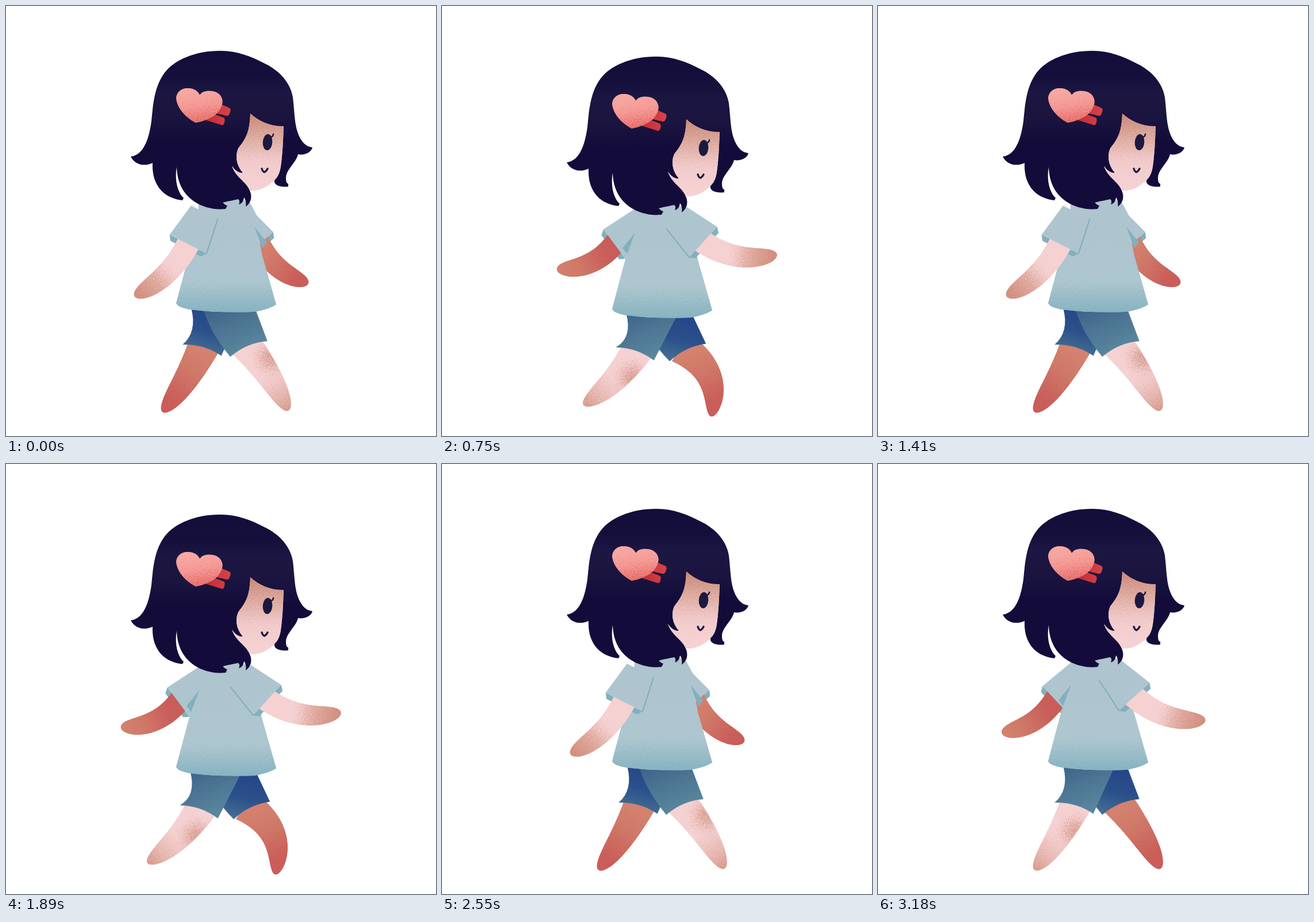
Animation, 748 px wide and 748 px high, one loop 3270 ms. Source, as an HTML page:

```html
<!DOCTYPE html>
<html lang="en">
<head>
<meta charset="utf-8">
<title>Walk cycle</title>
<style>
  html, body { margin: 0; width: 100%; height: 100%; overflow: hidden; background: #fff; }
  svg { display: block; width: 100vw; height: 100vh; }
</style>
</head>
<body>
<svg viewBox="0 0 748 748">
  <defs>
    <filter id="grain" color-interpolation-filters="sRGB">
      <feTurbulence type="fractalNoise" baseFrequency=".55" numOctaves="2" seed="4"/>
      <feColorMatrix values="1 0 0 0 0  0 1 0 0 0  0 0 1 0 0  0 0 0 0 1" result="noise"/>
      <feDisplacementMap in="SourceGraphic" in2="noise" scale="60" xChannelSelector="R" yChannelSelector="G"/>
    </filter>
    <linearGradient id="hairFill" x2="0" y2="1">
      <stop offset="0" stop-color="#130d3a"/><stop offset=".16" stop-color="#150f3c"/>
      <stop offset=".27" stop-color="#1c1642"/><stop offset=".42" stop-color="#1a143f"/>
      <stop offset=".58" stop-color="#130c3b"/><stop offset="1" stop-color="#130c3b"/>
    </linearGradient>
    <linearGradient id="faceFill" gradientUnits="userSpaceOnUse" x1="0" y1="185" x2="0" y2="322">
      <stop offset="0" stop-color="#c98876"/><stop offset=".3" stop-color="#dba99d"/>
      <stop offset=".62" stop-color="#f2cbcb"/><stop offset="1" stop-color="#f6d3d5"/>
    </linearGradient>
    <linearGradient id="heartFill" gradientUnits="userSpaceOnUse" x1="332" y1="142" x2="342" y2="203">
      <stop offset="0" stop-color="#f7aaa4"/><stop offset=".5" stop-color="#f59a95"/><stop offset="1" stop-color="#e56a68"/>
    </linearGradient>
    <linearGradient id="pinFill" x2="1"><stop offset="0" stop-color="#bf2c35"/><stop offset="1" stop-color="#d94347"/></linearGradient>
    <linearGradient id="shirtFill" gradientUnits="userSpaceOnUse" x1="0" y1="340" x2="0" y2="532">
      <stop offset="0" stop-color="#aec4ce"/><stop offset=".72" stop-color="#aec6cf"/><stop offset="1" stop-color="#86b3c0"/>
    </linearGradient>
    <linearGradient id="nearShorts" x2=".5" y2="1">
      <stop offset="0" stop-color="#3b6189"/><stop offset=".45" stop-color="#4b7492"/><stop offset="1" stop-color="#5a879f"/>
    </linearGradient>
    <linearGradient id="farShorts" x1=".6" x2=".3" y2="1">
      <stop offset="0" stop-color="#24468a"/><stop offset=".5" stop-color="#2b508a"/><stop offset="1" stop-color="#477394"/>
    </linearGradient>
    <clipPath id="faceClip"><path id="facePath" d="M425 187C440 201 461 210 483 209C482 235 481 258 478 279C476 292 472 298 467 303C452 317 438 322 424 321C418 305 399 298 393 278C398 286 405 291 412 290C400 277 398 258 405 246C420 228 424 214 425 187Z"/></clipPath>
    <clipPath id="shirtClip"><path id="shirtPath" d="M335 341Q400 329 424 342L436 364L439 400L445 432L470 519Q460 527 432 532Q370 534 330 529Q300 526 296 517L317 438L334 380Z"/></clipPath>
    <clipPath id="heartClip"><path id="heartPath" d="M337 155C341 148 352 146 363 149C375 153 379 164 375 174C370 188 355 198 330 203C315 195 298 180 296 160C297 149 306 142 318 143C328 144 334 148 337 155Z"/></clipPath>
  </defs>
  <g id="legs"></g>
  <g id="upper">
    <g id="farSide"></g>
    <use href="#shirtPath" fill="#aec5cf"/>
    <g clip-path="url(#shirtClip)"><rect x="270" y="310" width="230" height="260" fill="url(#shirtFill)" filter="url(#grain)"/></g>
    <g id="nearSide"></g>
    <path fill="url(#hairFill)" d="M375 78C402 78 427 88 448 99C478 113 495 135 499 159C503 192 501 215 515 235C521 243 527 245 533 246C531 255 519 260 508 258C505 272 488 284 487 298C487 305 488 309 491 309L491 314C478 316 465 312 467 303L440 300L424 321C429 332 426 343 417 349C418 342 417 337 414 333C413 340 410 344 405 345C407 340 406 338 404 336C396 338 388 339 377 342C380 345 383 347 385 347L382 353C345 357 298 336 297 280C293 302 298 324 309 334L307 338C275 335 253 312 255 273C240 280 224 276 217 262C240 259 249 230 253 200C256 170 258 140 276 116C293 93 332 77 375 78Z"/>
    <use href="#facePath" fill="#e8bab5"/>
    <g clip-path="url(#faceClip)"><rect x="370" y="165" width="140" height="180" fill="url(#faceFill)" filter="url(#grain)"/></g>
    <ellipse cx="455" cy="237" rx="8.3" ry="14" transform="rotate(4 455 237)" fill="#1c1941"/>
    <path d="M459 229Q465 227 465 223" fill="none" stroke="#1c1941" stroke-width="2.6" stroke-linecap="round"/>
    <path d="M445 283Q447 289 450 289Q454 286 455 283" fill="none" stroke="#1c1941" stroke-width="3.4" stroke-linecap="round" stroke-linejoin="round"/>
    <path fill="url(#pinFill)" d="M374 171L388 177Q392 179 390 184Q388 192 384 191L362 186ZM357 186L378 194Q382 196 380 202Q379 208 375 207L346 198Z"/>
    <use href="#heartPath" fill="#f1908c"/>
    <g clip-path="url(#heartClip)"><rect x="275" y="122" width="125" height="105" fill="url(#heartFill)" filter="url(#grain)"/></g>
  </g>
</svg>
<script>
const NS = 'http://www.w3.org/2000/svg';
const $ = id => document.getElementById(id);
const defs = document.querySelector('defs');
const SHIRT = '#aec5cf', FOLD = '#82b0bd', PINK = '#f5d1d2', RED = '#cb6a60';
const GROUND = 714, LOOP = 3270, CYCLE = 1140;
const FORWARD = 630, BEAT = 120, HOLD = 30;

const lerp = (a, b, k) => a + (b - a) * k;
const clamp = (v, lo, hi) => Math.min(hi, Math.max(lo, v));
const polygon = pts => 'M' + pts.join('L') + 'Z';

function set(el, attrs) {
  for (const name in attrs) el.setAttribute(name, attrs[name]);
  return el;
}
const add = (parent, tag, attrs = {}) => parent.appendChild(set(document.createElementNS(NS, tag), attrs));

// Local frame: angle in degrees from straight down, positive towards the face.
function frame([x, y], angle) {
  const a = angle * Math.PI / 180, s = Math.sin(a), c = Math.cos(a);
  return (along, across) => [x + along * s + across * c, y + along * c - across * s];
}

// A bowed, tapering, round-ended limb.
function limbShape(base, { angle, length, bow, from, to }) {
  const at = frame(base, angle), back = [], front = [];
  for (let i = 0; i <= 24; i++) {
    const t = -.1 + 1.1 * Math.sin(i / 24 * Math.PI / 2);
    const slope = 4 * bow * (1 - 2 * t), size = Math.hypot(length, slope);
    const w = lerp(from, to, t) * Math.sqrt(Math.max(0, 1 - t ** 6)) / size;
    const along = length * t, across = 4 * bow * t * (1 - t);
    back.push(at(along + slope * w, across - length * w));
    front.unshift(at(along - slope * w, across + length * w));
  }
  return { pts: [...back, ...front], base, tip: at(length, 0), knee: at(length * .27, bow * .8 + from * .8) };
}

function gradient(type, id, stops) {
  const g = add(defs, type, { id, gradientUnits: 'userSpaceOnUse' });
  for (const [offset, color, alpha = 1] of stops)
    add(g, 'stop', { offset, 'stop-color': color, 'stop-opacity': alpha });
  return g;
}

function makeLimb(parent, id, color, stops, { knee, leftToRight } = {}) {
  const clip = add(add(defs, 'clipPath', { id: id + 'Clip' }), 'path');
  const shade = gradient('linearGradient', id + 'Shade', stops);
  const patch = knee && gradient('radialGradient', id + 'Knee',
    [[0, '#cb8674', .85], [.4, '#cf8e7d', .5], [1, '#d59b8c', 0]]);
  const body = add(parent, 'path', { fill: color });
  const group = add(parent, 'g', { 'clip-path': `url(#${id}Clip)` });
  const rects = [shade, patch].filter(Boolean).map(g =>
    add(group, 'rect', { fill: `url(#${g.id})`, filter: 'url(#grain)' }));

  return (base, options) => {
    const limb = limbShape(base, options), d = polygon(limb.pts);
    const xs = limb.pts.map(p => p[0]), ys = limb.pts.map(p => p[1]);
    const x = Math.min(...xs) - 25, y = Math.min(...ys) - 25;
    let ends = [limb.base, limb.tip];
    if (leftToRight) ends.sort((a, b) => a[0] - b[0]);
    set(body, { d });
    set(clip, { d });
    set(shade, { x1: ends[0][0], y1: ends[0][1], x2: ends[1][0], y2: ends[1][1] });
    if (patch) set(patch, { cx: limb.knee[0], cy: limb.knee[1], r: 32 });
    for (const r of rects)
      set(r, { x, y, width: Math.max(...xs) - x + 25, height: Math.max(...ys) - y + 25 });
  };
}

// Sleeve and arm: the sleeve follows the arm's angle by a fixed share.
function makeArm(parent, id, color, stops, body, options) {
  const hem = add(parent, 'path', { fill: FOLD });
  const limb = makeLimb(parent, id, color, stops, options);
  const sleeve = add(parent, 'path', { fill: SHIRT });

  return angle => {
    const at = frame([body.x + body.shift * angle, body.y], angle * body.follow);
    const { top, cuff, drop } = body;
    const backTop = at(0, -top), frontTop = at(0, top);
    const backHem = at(drop, -cuff), frontHem = at(drop, cuff);
    set(hem, { d: polygon([backHem, at(drop + 9, 6 - cuff), at(drop + 9, cuff - 6), frontHem]) });
    set(sleeve, { d: polygon([backTop, backHem, frontHem, frontTop]) });
    limb(at(drop, 0), {
      angle, length: body.length, bow: -15 * Math.sin(angle * Math.PI / 180),
      from: body.width, to: body.width - 3
    });
    return { backTop, frontTop, backHem, frontHem };
  };
}

// Leg and shorts: reach runs from -1 (behind) to 1 (in front).
function makeLeg(id, color, stops, options) {
  const limb = makeLimb($('legs'), id + 'Leg', color, stops, options);
  const shorts = add($('legs'), 'path', { fill: `url(#${id}Shorts)` });

  return (reach, extreme, lift, height) => {
    const thigh = 1.5 + 32.5 * reach;
    const hem = frame([380, 533 + height], thigh)(75, 0);
    const shin = 32.5 * clamp(reach, -1, 1) - 12.5 * extreme - 30 * lift;
    const bow = 4 + extreme * (10 + 6 * reach) + 22 * lift;
    const room = (GROUND - hem[1]) / Math.cos(shin * Math.PI / 180);
    limb(hem, { angle: shin, length: Math.min(131 - bow / 2, room), bow, from: 27, to: 15 });

    const at = frame(hem, thigh * .6), waist = 377 + .32 * thigh, y = 525 + height;
    set(shorts, { d: `M${waist - 45} ${y}Q${waist - 34} ${y + 42} ${at(3, -35)}Q${at(-10, 0)} ${at(0, 35)}L${waist + 45} ${y}Z` });
  };
}

const redStops = [[0, '#d4826f'], [.35, '#cf7868'], [.8, '#c95d59'], [1, '#c95d59']];
const farLeg = makeLeg('far', RED, redStops);
const nearLeg = makeLeg('near', PINK,
  [[0, PINK], [.45, PINK], [.8, '#e5b5ad'], [1, '#d69a8b']], { knee: true });
const farArm = makeArm($('farSide'), 'farArm', RED, redStops,
  { x: 378, y: 366, shift: .4, follow: .8, top: 28, cuff: 32, drop: 64, length: 109, width: 19 },
  { leftToRight: true });
const farFold = add($('nearSide'), 'path', { fill: FOLD });
const nearArm = makeArm($('nearSide'), 'nearArm', PINK,
  [[0, PINK], [.4, PINK], [.66, '#dfa99e'], [1, '#d18c7c']],
  { x: 368, y: 359, shift: .5, follow: .59, top: 26, cuff: 36, drop: 62, length: 130, width: 20 });
const crease = add($('nearSide'), 'path', { stroke: FOLD, 'stroke-width': 2.2, 'stroke-linecap': 'round' });

// The walk is drawn on beats; each end of the swing is held a little longer.
function poseAt(time) {
  const t = (time % LOOP + CYCLE - BEAT) % CYCLE;
  const forward = t < FORWARD;
  const beats = forward ? 5 : 4;
  const beat = Math.max(0, Math.floor(((forward ? t : t - FORWARD) - HOLD) / BEAT));
  const extreme = beat === 0 ? 1 : 0;
  const swing = clamp(1.42 * Math.cos(Math.PI * beat / beats), -1, 1) * (forward ? -1 : 1);
  const passing = 1 - swing * swing;
  return {
    forward, extreme, passing,
    swing: swing * (1 + .15 * extreme),
    height: 10 * extreme - passing * (forward ? 13 : 4)
  };
}

function draw({ forward, extreme, passing, swing, height }) {
  farLeg(swing, extreme, forward ? passing : 0, height);
  nearLeg(-swing, extreme, forward ? 0 : passing, height);
  farArm(-3.5 - 55 * swing);
  const sleeve = nearArm(13 + 59 * swing);
  set(crease, {
    d: swing < 0 ? `M${sleeve.frontTop}L${sleeve.frontHem}` : `M${sleeve.backTop}L${sleeve.backHem}`
  });
  const side = x => 384 - Math.sign(swing) * x;
  set(farFold, {
    d: polygon([[side(48), 384], [side(62), 421], [side(70), 411]]),
    opacity: passing > .5 ? 0 : 1
  });
  set($('upper'), { transform: `translate(0 ${height})` });
}

let shown;
function tick() {
  const pose = poseAt(performance.now()), key = JSON.stringify(pose);
  if (key !== shown) draw(pose);
  shown = key;
  requestAnimationFrame(tick);
}
tick();
</script>
</body>
</html>
```
